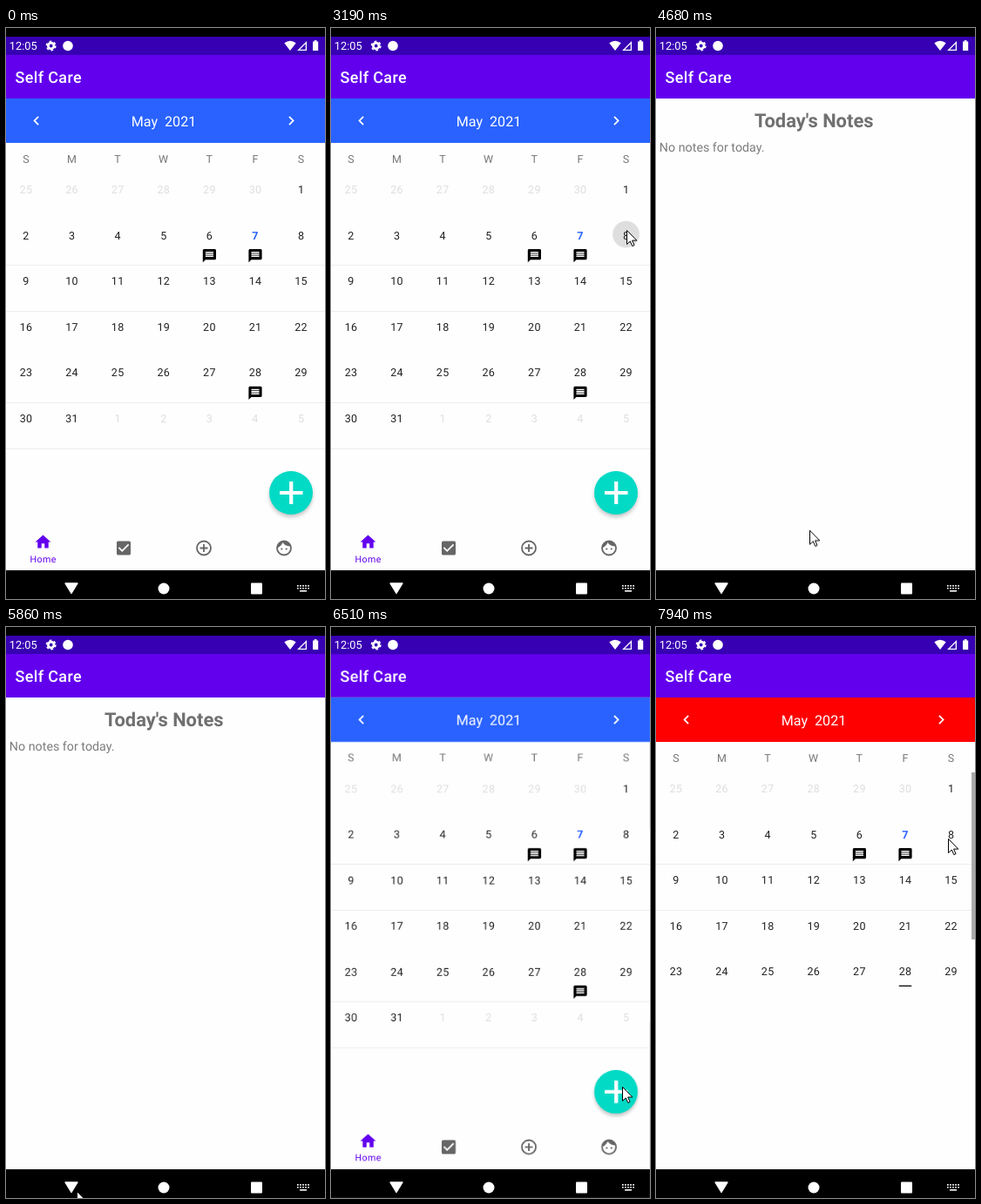
An HTML page for the animation above (8 s loop, 366 by 656 pixels).

```html
<!DOCTYPE html>
<html lang="en">
<head>
<meta charset="utf-8">
<title>Self Care</title>
<style>
  html, body { margin: 0; width: 100%; height: 100%; overflow: hidden; background: #000; }
  svg { display: block; width: 366px; height: 656px; font-family: Roboto, sans-serif; }
  text { white-space: pre; }
  .mid { text-anchor: middle; }
  .day { font-size: 12.5px; letter-spacing: .3px; text-anchor: middle; fill: #212121; }
  .week { fill: #777; }
  .faded { fill: #dedede; }
  .today { fill: #2962ff; font-weight: 700; }
  .fab { filter: drop-shadow(0 3px 2px rgba(0, 0, 0, .22)); }

  .screen { transform-origin: 183px 333px; }
  #home { animation: home 8s linear infinite; }
  #notes { animation: notes 8s linear infinite, notes-fade 8s linear infinite; }
  #picker { animation: picker 8s linear infinite, picker-fade 8s linear infinite; }
  #touch { animation: touch 8s step-end infinite; }
  #press { animation: press 8s step-end infinite; }
  #cursor { animation: cursor 8s linear infinite; }

  /* Each window change is a fast start up to 40 %, then a long slow tail. */
  @keyframes home {
    0% { transform: none; }
    42.125% { transform: none; animation-timing-function: cubic-bezier(.3, 0, .8, .15); }
    42.958% { transform: scale(1.06); animation-timing-function: cubic-bezier(.05, .7, .1, 1); }
    47.125%, 73.7% { transform: scale(1.15); }
    73.75% { transform: scale(1.1); animation-timing-function: cubic-bezier(.3, 0, .8, .15); }
    74.583% { transform: scale(1.06); animation-timing-function: cubic-bezier(.05, .7, .1, 1); }
    78.75% { transform: none; }
    86.25% { transform: none; animation-timing-function: cubic-bezier(.3, 0, .8, .15); }
    87.083% { transform: scale(1.06); animation-timing-function: cubic-bezier(.05, .7, .1, 1); }
    91.25%, 100% { transform: scale(1.15); }
  }
  @keyframes notes {
    0% { transform: scale(.85); }
    42.125% { transform: scale(.85); animation-timing-function: cubic-bezier(.3, 0, .8, .15); }
    42.958% { transform: scale(.91); animation-timing-function: cubic-bezier(.05, .7, .1, 1); }
    47.125% { transform: none; }
    73.75% { transform: none; animation-timing-function: cubic-bezier(.3, 0, .8, .15); }
    74.583% { transform: scale(.96); animation-timing-function: cubic-bezier(.05, .7, .1, 1); }
    78.75%, 100% { transform: scale(.9); }
  }
  @keyframes notes-fade {
    0%, 42.56% { opacity: 0; }
    43.19%, 74.19% { opacity: 1; }
    74.81%, 100% { opacity: 0; }
  }
  @keyframes picker {
    0% { transform: scale(.85); }
    86.25% { transform: scale(.85); animation-timing-function: cubic-bezier(.3, 0, .8, .15); }
    87.083% { transform: scale(.91); animation-timing-function: cubic-bezier(.05, .7, .1, 1); }
    91.25%, 100% { transform: none; }
  }
  @keyframes picker-fade {
    0%, 86.69% { opacity: 0; }
    87.31%, 100% { opacity: 1; }
  }
  @keyframes touch {
    0% { opacity: 0; }
    39.85% { opacity: 1; }
    60%, 100% { opacity: 0; }
  }
  @keyframes press {
    0% { opacity: 0; }
    83.1% { opacity: .12; }
    83.6%, 100% { opacity: .24; }
  }
  @keyframes cursor {
    0%, 11.6% { transform: translate(146px, 660px); }
    21.375% { transform: translate(326px, 268px); }
    22.875% { transform: translate(332px, 360px); }
    24.375% { transform: translate(323px, 479px); }
    29.125%, 30.7% { transform: translate(319px, 544px); }
    34.5%, 40.5% { transform: translate(339px, 232px); }
    45.75% { transform: translate(162px, 506px); }
    49.5% { transform: translate(63px, 616px); }
    53.375%, 56.25% { transform: translate(71px, 625px); }
    60% { transform: translate(245px, 545px); }
    62% { transform: translate(354px, 522px); }
    66.6% { transform: translate(115px, 648px); }
    70.25%, 74.9% { transform: translate(81px, 648px); }
    80.9%, 86% { transform: translate(334px, 528px); }
    95.5% { transform: translate(147px, 157px); }
    99.1%, 100% { transform: translate(335px, 243px); }
  }
</style>
</head>
<body>
<svg id="stage" viewBox="0 0 366 656" text-rendering="geometricPrecision"></svg>
<script>
const ICONS = {
  left: 'M15.41 7.41L14 6l-6 6 6 6 1.41-1.41L10.83 12z',
  right: 'M10 6L8.59 7.41 13.17 12l-4.58 4.59L10 18l6-6z',
  note: 'M20 2H4c-1.1 0-2 .9-2 2v18l4-4h14c1.1 0 2-.9 2-2V4c0-1.1-.9-2-2-2zm-2 12H6v-2h12v2zm0-3H6V9h12v2zm0-3H6V6h12v2z',
  home: 'M10 20v-6h4v6h5v-8h3L12 3 2 12h3v8z',
  check: 'M19 3H5c-1.1 0-2 .9-2 2v14c0 1.1.9 2 2 2h14c1.1 0 2-.9 2-2V5c0-1.1-.9-2-2-2zm-9 14l-5-5 1.4-1.4 3.6 3.6 7.6-7.6L19 8z'
};

const rect = (x, y, w, h, fill) =>
  `<rect x="${x}" y="${y}" width="${w}" height="${h}" fill="${fill}"/>`;

const circle = (x, y, r, attrs) => `<circle cx="${x}" cy="${y}" r="${r}" ${attrs}/>`;

const text = (x, y, size, content, attrs) =>
  `<text x="${x}" y="${y}" font-size="${size}" ${attrs}>${content}</text>`;

// Places a 24-unit icon with its middle at x, y.
const icon = (name, x, y, scale, fill) =>
  `<path transform="translate(${x} ${y}) scale(${scale}) translate(-12 -12)" fill="${fill}" d="${ICONS[name]}"/>`;

const columnX = i => 23 + 52.6 * i;

function monthHeader(color) {
  return rect(0, 81, 366, 51, color) +
    icon('left', 34.8, 106.5, .87, '#fff') +
    icon('right', 327.3, 106.5, .87, '#fff') +
    text(181, 113, 16.1, 'May  2021', 'class="mid" fill="#fff"') +
    [...'SMTWTFS'].map((d, i) => text(columnX(i), 154.5, 12.5, d, 'class="day week"')).join('');
}

function monthGrid() {
  let out = [272, 325, 430, 483].map(y => rect(0, y, 366, 1, '#ededed')).join('');
  for (let i = 0; i < 42; i++) {
    const n = i - 5;
    const label = n < 1 ? n + 30 : n > 31 ? n - 31 : n;
    const state = n < 1 || n > 31 ? 'faded' : n === 7 ? 'today' : '';
    const x = columnX(i % 7);
    const y = 190 + 52.6 * Math.floor(i / 7);
    out += text(x, y, 12.5, label, `class="day ${state}"`);
    if ([6, 7, 28].includes(n)) out += icon('note', x, y + 19, .76, '#000');
  }
  return out;
}

function screen(id, content) {
  return `<g class="screen" id="${id}">` +
    rect(0, 10, 366, 646, '#000') +
    rect(0, 10, 366, 21, '#3700b3') +
    rect(0, 31, 366, 50, '#6200ee') +
    rect(0, 81, 366, 542, '#fefefe') +
    text(10.5, 63.3, 18, 'Self Care', 'fill="#fff" font-weight="500" letter-spacing=".35"') +
    content + '</g>';
}

function bottomTabs() {
  const grey = '#666';
  const ring = x => circle(x, 597.5, 8, `fill="none" stroke="${grey}" stroke-width="1.8"`);
  return icon('home', 42.5, 590.5, .89, '#6200ee') +
    text(42.7, 613.5, 10.7, 'Home', 'class="mid" fill="#6200ee" letter-spacing=".45"') +
    icon('check', 135, 597.5, .89, grey) +
    ring(227) + `<path d="M227 593v9M222.5 597.5h9" stroke="${grey}" stroke-width="1.8"/>` +
    ring(319) + circle(316.3, 598.5, 1.1, `fill="${grey}"`) + circle(321.7, 598.5, 1.1, `fill="${grey}"`) +
    `<path d="M311 597.5Q316 595 317.5 591Q320.5 596 327 595.3Q325 589.5 319 589.5Q312 590 311 597.5Z" fill="${grey}"/>`;
}

function addButton() {
  return circle(327, 534, 25, 'class="fab" fill="#03dac5"') +
    '<path d="M327.2 521v26M314 534h26.5" stroke="#fff" stroke-width="4.2"/>' +
    circle(327, 534, 25, 'id="press" fill="#fff"');
}

function systemBars() {
  return text(3.8, 25.2, 12.8, '12:05', 'fill="#fff"') +
    circle(51.7, 20.5, 3.3, 'fill="none" stroke="#fff" stroke-width="2.8"') +
    circle(51.7, 20.5, 5.2, 'fill="none" stroke="#fff" stroke-width="1.6" stroke-dasharray="2.7 2.745"') +
    circle(71, 20.5, 5.8, 'fill="#fff"') +
    '<g fill="#fff"><path d="M326 26L319.3 17.3Q326 12.3 332.7 17.3Z"/>' +
    '<path d="M345 15V26H334Z M343.7 18.2L337.2 24.7H343.7Z" fill-rule="evenodd"/>' +
    '<path d="M352 15.4h1.8V14h2.6v1.4h1.8V26h-6.2z"/>' +
    '<path d="M68 638h14l-7 11.5z" stroke="#fff" stroke-width="1.4" stroke-linejoin="round"/>' +
    '<rect x="281" y="637.5" width="13" height="13" rx="1"/></g>' +
    circle(181, 644, 6.5, 'fill="#fff"') +
    '<path d="M334 640.9h14M334 643.7h14" stroke="#fff" stroke-width="1.6" stroke-dasharray="1.7 1.35"/>' +
    '<path d="M337 646.8h8" stroke="#fff" stroke-width="1.6"/>';
}

const notesPage =
  text(181.3, 114.3, 21.9, 'Today\'s Notes', 'class="mid" fill="#707070" font-weight="700"') +
  text(3.8, 141.8, 14.29, 'No notes for today.', 'fill="#7c7c7c"');

document.getElementById('stage').innerHTML =
  `<clipPath id="display">${rect(0, 10, 366, 646, '#000')}</clipPath>
  <clipPath id="list">${rect(0, 132, 366, 281, '#000')}</clipPath>
  <g clip-path="url(#display)">` +
  screen('home', monthHeader('#2962ff') +
    circle(338.5, 237, 15.4, 'id="touch" fill="#dedede"') +
    monthGrid() + addButton() + bottomTabs()) +
  screen('notes', notesPage) +
  screen('picker', monthHeader('#f00') +
    `<g clip-path="url(#list)">${monthGrid()}</g>` +
    rect(362, 167, 4, 192, '#aaa')) +
  systemBars() +
  `</g>
  <path id="cursor" d="M.5 .5V16.5L4.3 13L6.8 18.6L9 17.6L6.6 12.1H11.8Z" fill="#fff" stroke="#000"/>`;
</script>
</body>
</html>
```
